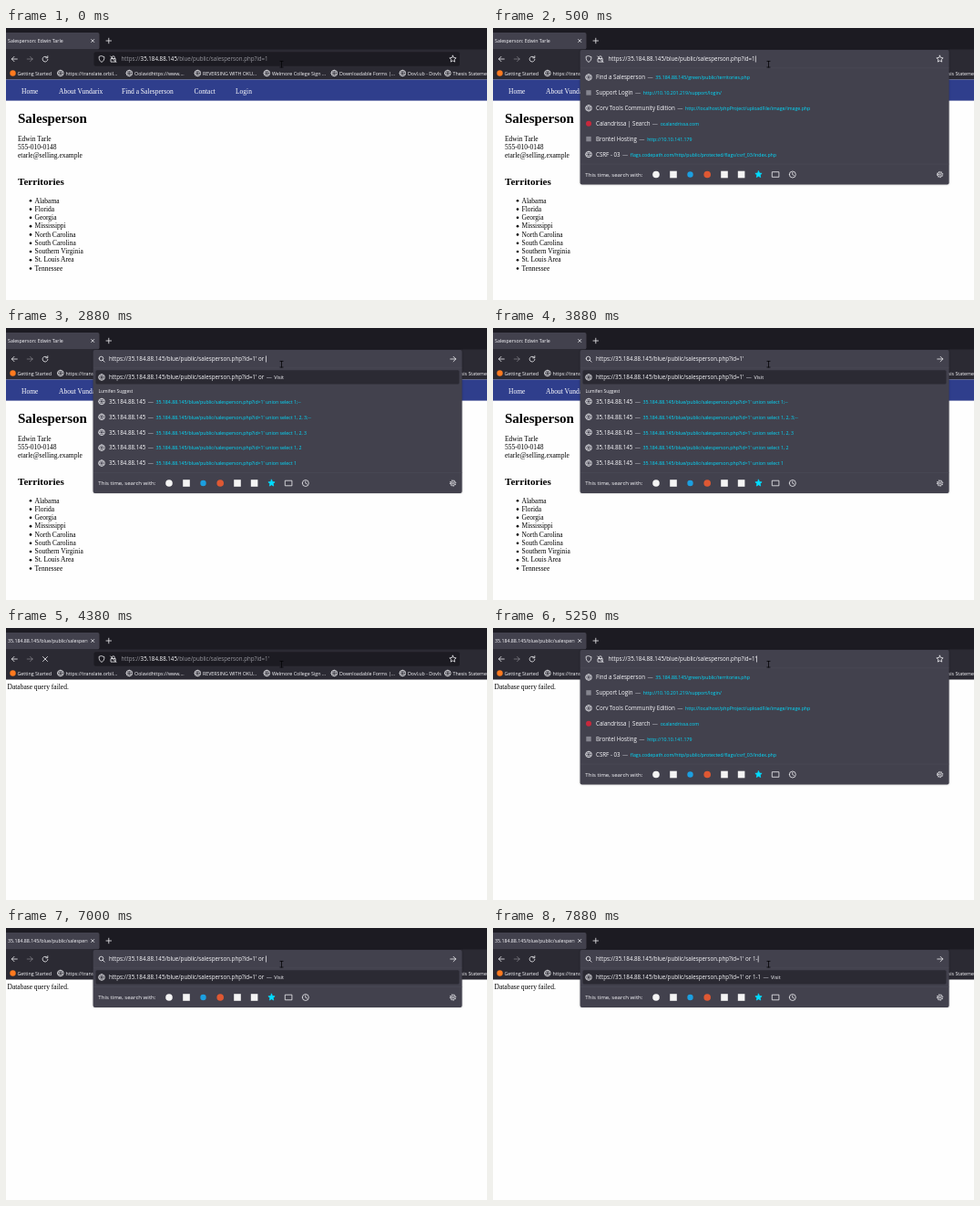
These frames come from a looping animation (528 px wide and 298 px high, 8 s). An HTML page:

```html
<!DOCTYPE html>
<html lang="en">
<head>
<meta charset="utf-8">
<title>Salesperson lookup</title>
<style>
html, body { margin: 0; height: 100%; overflow: hidden; background: #fefefe; }
svg { display: block; width: 100vw; height: 100vh; }
text { white-space: pre; }
.ui { font-family: "Open Sans", "Noto Sans", sans-serif; }
.page { font-family: "Liberation Serif", "Noto Serif", serif; }
.line { fill: none; stroke: #fbfbfe; stroke-width: .75; stroke-linecap: round; stroke-linejoin: round; }
.panel { filter: drop-shadow(0 .5px 1px #0004); }
</style>
</head>
<body>
<svg id="stage" viewBox="0 0 528 298"></svg>
<script>
const stage = document.getElementById('stage');
const LOOP = 8000, WHITE = '#fbfbfe', CYAN = '#00ddff', EDGE = '#4d4c58';
const HOST = '35.184.88.145', PATH = '/blue/public/salesperson.php?id=1';
const MAIN = 6.19, LINK = 5.23;

// [time, view, typed after the address, suggestion if it lags behind]
const steps = [
  [0, 'closed', ''],
  [130, 'top', ''],
  [250, 'top', ''],
  [1250, 'list', "'"],
  [2250, 'list', "' "],
  [2500, 'list', "' o"],
  [2630, 'list', "' or"],
  [2750, 'list', "' or "],
  [3000, 'list', "' or"],
  [3130, 'list', "' o"],
  [3250, 'list', "' "],
  [3380, 'list', "'"],
  [4000, 'closed', "'"],
  [5250, 'top', "'"],
  [6250, 'list', "' "],
  [6500, 'list', "' o"],
  [6630, 'list', "' or"],
  [6750, 'list', "' or "],
  [7000, 'short', "' or "],
  [7250, 'short', "' or 1"],
  [7380, 'short', "' or 1-"],
  [7500, 'short', "' or 1-1"],
  [7880, 'short', "' or 1-", "' or 1-1"]
];

const topSites = [
  ['globe', 'Find a Salesperson', HOST + '/green/public/territories.php'],
  ['gray', 'Support Login', 'http://10.10.201.219/support/login/'],
  ['globe', 'Corv Tools Community Edition', 'http://localhost/phpProject/uploadFile/image/image.php'],
  ['red', 'Calandrissa | Search', 'ocalandrissa.com'],
  ['gray', 'Brontel Hosting', 'http://10.10.141.179'],
  ['globe', 'CSRF - 03', 'flags.codepath.com/http/public/protected/flags/csrf_03/index.php']
];
const visited = ['1;--', '1, 2, 3;--', '1, 2, 3', '1, 2', '1']
  .map(q => ['globe', HOST, `${HOST}${PATH}' union select ${q}`]);

const bookmarks = [
  [12.5, 'Getting Started'], [65.5, 'https://translate.orbil...'], [141, 'Oolavidhttps://www....'],
  [216, 'REVERSING WITH OKU...'], [292, 'Welmore College Sign ...'], [366, 'Downloadable Forms |...'],
  [441, 'Dovl.ub - Dovls'], [490.5, 'Thesis Statement']
];
const nav = [[17, 'Home'], [58, 'About Vundarix'], [127, 'Find a Salesperson'], [206.5, 'Contact'], [252, 'Login']];
const states = ['Alabama', 'Florida', 'Georgia', 'Mississippi', 'North Carolina', 'South Carolina',
  'Southern Virginia', 'St. Louis Area', 'Tennessee'];

const text = (x, y, s, size, fill = WHITE, attr = '') =>
  `<text x="${x}" y="${y}" font-size="${size}" fill="${fill}" ${attr}>${s}</text>`;
const span = (s, size, fill, dx) => `<tspan dx="${dx}" font-size="${size}" fill="${fill}">${s}</tspan>`;
const dash = span('—', MAIN, '#b5b5bd', 2.4);
const rect = (x, y, w, h, fill, r = 0) =>
  `<rect x="${x}" y="${y}" width="${w}" height="${h}" rx="${r}" fill="${fill}"/>`;
const disc = (x, y, r, fill) => `<circle cx="${x}" cy="${y}" r="${r}" fill="${fill}"/>`;
const line = (x, y, d, style = '') => `<path class="line" transform="translate(${x} ${y})" d="${d}" style="${style}"/>`;

const ring = r => `M${-r} 0a${r} ${r} 0 1 0 ${2 * r} 0a${r} ${r} 0 1 0 ${-2 * r} 0`;
const globe = (x, y) => line(x, y, ring(3.3), 'stroke-width:.7') +
  line(x, y, 'M-3 -1.2H3M-3 1.2H3M0 -3.3C-2 -1.5 -2 1.5 0 3.3C2 1.5 2 -1.5 0 -3.3', 'stroke-width:.45');
const star = (x, y, r, style) => {
  const pts = [...Array(10)].map((_, i) => {
    const a = i * Math.PI / 5, k = i % 2 ? r * .48 : r;
    return (k * Math.sin(a)).toFixed(2) + ' ' + (-k * Math.cos(a)).toFixed(2);
  });
  return line(x, y, `M${pts.join('L')}Z`, style);
};
const icon = (kind, x, y) => kind === 'globe' ? globe(x, y)
  : kind === 'red' ? disc(x, y, 3, '#c8283c') : rect(x - 2.7, y - 2.7, 5.4, 5.4, '#85858f');

const shieldAndLock = () =>
  line(105, 34, 'M0 -3.3L2.9 -2.3C3 .5 2 2.4 0 3.4C-2 2.4 -3 .5 -2.9 -2.3Z') +
  line(117.8, 34, 'M-2.4 -.4H2.4V3.1H-2.4ZM-1.5 -.4V-1.6A1.5 1.6 0 0 1 1.5 -1.6V-.4M-3 -3L3.2 3.6');

function browser(failed, loading) {
  const title = failed ? HOST + '/blue/public/salesperson.php' : 'Salesperson: Edwin Tarle';
  return rect(0, 0, 528, 24, '#1c1b22') + rect(-3, 5, 105.5, 18.5, '#42414d', 2) +
    '<clipPath id="tab"><path d="M0 5H89.5V23H0Z"/></clipPath>' +
    text(2, 16, title, 5.28, WHITE, 'clip-path="url(#tab)"') +
    line(95.2, 14, 'M-1.5 -1.5L1.5 1.5M1.5 -1.5L-1.5 1.5') +
    line(112.8, 14, 'M-2.8 0H2.8M0 -2.8V2.8') +
    rect(0, 23.5, 528, 33.5, '#2b2a33') +
    line(9.3, 34, 'M3 0H-3M-.3 -2.7L-3 0L-.3 2.7') +
    line(26.2, 34, 'M-3 0H3M.3 -2.7L3 0L.3 2.7', 'opacity:.4') +
    (loading ? line(43, 34, 'M-2.5 -2.5L2.5 2.5M2.5 -2.5L-2.5 2.5')
      : line(43, 34, 'M2.2 -1.8A2.9 2.9 0 1 0 2.9 .4M2.8 -3.3V-1.2H.7')) +
    bookmarks.map(([x, s], i) => (i ? globe(x - 5.7, 49.5) : disc(7.5, 49.5, 3.2, '#ff7a1f')) +
      text(x, 51.5, s, 5.31)).join('');
}

function page(failed) {
  const body = rect(0, 56.5, 528, 241.5, '#fefefe');
  if (failed) return body + text(1.5, 67.4, 'Database query failed.', 7.5, '#000');
  return body + rect(0, 56.5, 528, 23.1, '#2f3e8c') +
    nav.map(([x, s]) => text(x, 71.6, s, 7.5, '#fff')).join('') +
    text(13, 104.3, 'Salesperson', 15, '#000', 'font-weight="bold"') +
    ['Edwin Tarle', '555-010-0148', 'etarle@selling.example']
      .map((s, i) => text(13, 124.3 + i * 8.9, s, 7.5, '#000')).join('') +
    text(13, 172.3, 'Territories', 11.1, '#000', 'font-weight="bold"') +
    states.map((s, i) => disc(27, 189.3 + i * 9.28, 1.3, '#000') +
      text(31.5, 191.5 + i * 9.28, s, 7.5, '#000')).join('');
}

const row = ([kind, name, link], y) => icon(kind, 105, y) +
  text(113, y + 2.2, name + dash + span(link, LINK, CYAN, 2.6), MAIN);

function engines(y) {
  return rect(96, y - 11.7, 404.5, .5, EDGE) + text(101.3, y + 2.2, 'This time, search with:', 6.1) +
    disc(179, y, 3.8, '#f4f4f4') + rect(194.2, y - 3.8, 7.6, 7.6, '#f4f4f4') +
    disc(216.5, y, 3.2, '#1c9fe0') + disc(235.2, y, 3.8, '#de5833') +
    rect(250.2, y - 3.8, 7.6, 7.6, '#f4f4f4') + rect(268.8, y - 3.8, 7.6, 7.6, '#f4f4f4') +
    star(291.5, y, 3.8, `fill:${CYAN};stroke:${CYAN}`) +
    line(310.3, y, 'M-3.6 -2.8H3.6V2.8H-3.6Z') +
    line(328.8, y, ring(3.5) + 'M0 -2V.2L1.5 1') +
    line(490.6, y, ring(2.5) + ring(.9), 'stroke-width:.65') +
    line(490.6, y, ring(3.2), 'stroke-dasharray:1.1 1.413;stroke-linecap:butt;stroke-width:.9');
}

function panel(view, typed, shown, rows) {
  const bottom = { top: 171.5, list: 181, short: 87 }[view];
  const url = 'https://' + HOST + PATH;
  let out = `<g class="panel">${rect(95.6, 24, 405, bottom - 24, '#42414d', 2)}</g>` +
    rect(96, 43.6, 404.5, .5, EDGE);
  if (view === 'top') {
    out += shieldAndLock() + star(490.5, 34, 3.8) + rows.map((r, i) => row(r, 54 + i * 16.9)).join('');
  } else {
    out += line(104.5, 33.5, ring(2.3) + 'M1.7 1.7L3.6 3.6') +
      line(490.8, 34, 'M-3 0H3M.3 -2.7L3 0L.3 2.7') +
      rect(98.5, 46.2, 399, 15.2, '#2b2a33', 1.5) + globe(105, 54) +
      text(113, 56.2, url + shown.trim() + dash + span('Visit', 5.5, WHITE, 2.4), MAIN);
  }
  if (view === 'list')
    out += text(101.5, 70.6, 'Lumifen Suggest', 4.9) + rows.map((r, i) => row(r, 80.5 + i * 16.9)).join('');
  return out + engines(bottom - 11) +
    text(view === 'top' ? 126.5 : 113, 36.2, url + typed, MAIN, WHITE, 'id="url"') +
    '<rect id="caret" y="30.5" width=".7" height="7" fill="#fbfbfe"/>';
}

function closedBar(typed) {
  return rect(96.5, 26.3, 401.5, 15.4, '#1c1b22', 2) + shieldAndLock() + star(490.5, 34, 3.8) +
    text(126.5, 36.2, 'https://' + span(HOST, MAIN, WHITE, 0) + PATH + typed, MAIN, '#98989f');
}

function suggestions(t, view) {
  if (view === 'top') return topSites;
  const late = topSites.slice(1);
  if (t < 1500) return visited.map((r, i) => [late[i][0], r[1], r[2]]);
  return t >= 6250 && t < 6500 ? late : visited;
}

let last = '';
function draw(t) {
  const [start, view, typed, shown = typed] = steps.findLast(s => s[0] <= t);
  const failed = t >= 4250, loading = t >= 4000 && t < 4880;
  const html = `<g class="ui">${browser(failed, loading)}</g><g class="page">${page(failed)}</g><g class="ui">` +
    (view === 'closed' ? closedBar(typed) : panel(view, typed, shown, suggestions(t, view))) + '</g>' +
    line(302.5, 39.7, 'M-1.6 -3.3H1.6M0 -3.3V3.3M-1.6 3.3H1.6', 'stroke:#050507;stroke-width:.8');
  if (html !== last) stage.innerHTML = last = html;

  const caret = document.getElementById('caret');
  if (!caret) return;
  const url = document.getElementById('url');
  caret.setAttribute('x', +url.getAttribute('x') + url.getComputedTextLength() + .3);
  caret.setAttribute('opacity', Math.floor((t - start) / 500) % 2 ? 0 : 1);
}

function tick() {
  draw(performance.now() % LOOP);
  requestAnimationFrame(tick);
}
tick();
</script>
</body>
</html>
```
